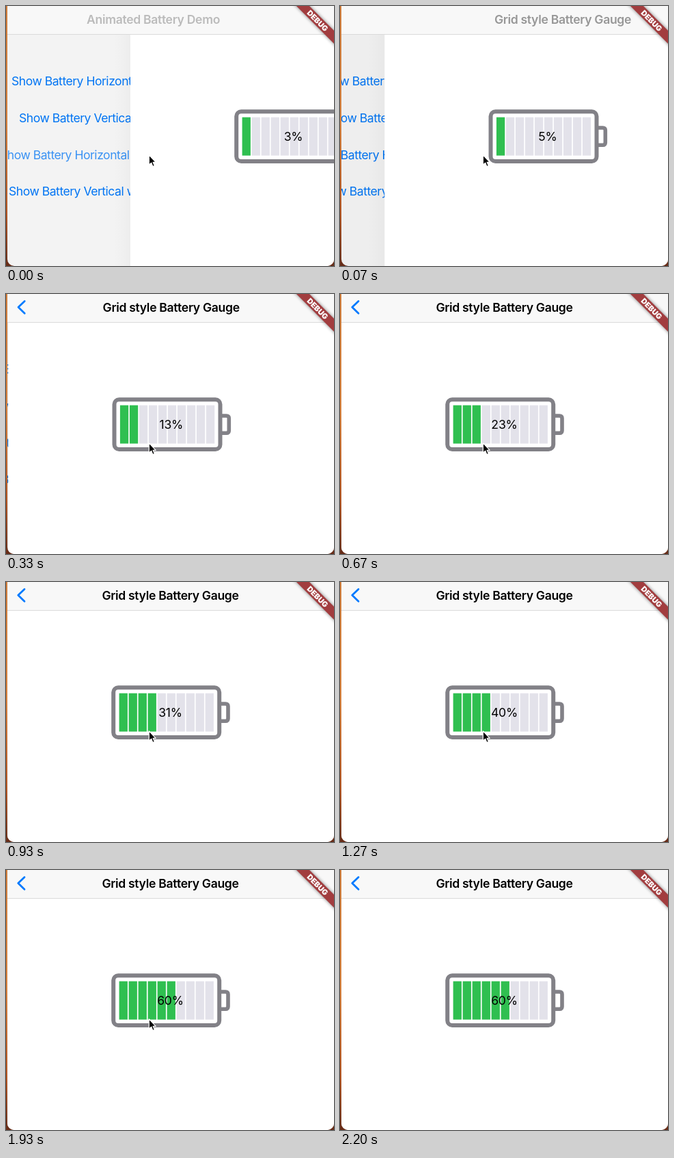
Recreate the animation shown at these times as an HTML page. Size 480 px wide and 380 px high, loop 2.59 s.

```html
<!DOCTYPE html>
<html lang="en">
<head>
<meta charset="utf-8">
<title>Battery gauge</title>
<style>
  html, body { margin: 0; width: 100%; height: 100%; overflow: hidden; }
  svg { display: block; width: 480px; height: 380px; }
  text { font-family: Inter, "Open Sans", sans-serif; font-size: 17.6px; }
  .title { font-weight: 600; letter-spacing: -.33px; text-anchor: middle; }
  .link { fill: #007aff; letter-spacing: -.5px; }
  .label { letter-spacing: -.2px; text-anchor: middle; }
  .ribbon { font-size: 11px; font-weight: 900; fill: #fff; text-anchor: middle; }
  .shell { fill: #fff; stroke: #828187; stroke-width: 6; }
</style>
</head>
<body>
<svg viewBox="0 0 480 380">
  <defs>
    <linearGradient id="desk" x2="0" y2="1">
      <stop offset="0" stop-color="#cf7c3a"/>
      <stop offset=".45" stop-color="#d57f3a"/>
      <stop offset=".8" stop-color="#b0521f"/>
      <stop offset="1" stop-color="#652c18"/>
    </linearGradient>
    <linearGradient id="edge">
      <stop offset="0" stop-opacity="0"/>
      <stop offset="1" stop-opacity=".025"/>
    </linearGradient>
    <filter id="blur" x="-20%" y="-100%" width="140%" height="300%">
      <feGaussianBlur stdDeviation="2.5"/>
    </filter>
    <clipPath id="window"><path d="M2 0H480V370a10 10 0 0 1-10 10H12a10 10 0 0 1-10-10Z"/></clipPath>
  </defs>

  <rect width="480" height="380" fill="url(#desk)"/>
  <g clip-path="url(#window)">
    <rect width="480" height="380" fill="#fff"/>
    <g id="home"></g>
    <rect id="dim" width="480" height="380"/>

    <g id="page">
      <rect x="-22" y="42" width="24" height="338" fill="url(#edge)"/>
      <rect x="2" y="42" width="478" height="338" fill="#fff"/>
      <path class="shell" d="M313 178H321.2Q325 178 325 181.8V199.4Q325 203.2 321.2 203.2H313" style="stroke-width:5.6"/>
      <rect class="shell" x="157.2" y="154.3" width="155" height="72.7" rx="7"/>
      <g id="bars"></g>
      <text id="label" class="label" x="240.5" y="197"></text>
    </g>

    <rect width="480" height="42" fill="#f8f8f8"/>
    <rect y="41" width="480" height="1" fill="#dadada"/>
    <text id="oldTitle" class="title" y="26">Animated Battery Demo</text>
    <text id="newTitle" class="title" y="26">Grid style Battery Gauge</text>
    <path id="back" d="M27 10.5L17.8 19.3L27 28.2" fill="none" stroke="#007aff" stroke-width="2.8" stroke-linecap="round" stroke-linejoin="round"/>

    <g transform="translate(456 21.5) rotate(45)">
      <rect x="-60" y="-6.7" width="120" height="13.4" opacity=".5" filter="url(#blur)"/>
      <rect x="-60" y="-6.7" width="120" height="13.4" fill="#a23d3f"/>
      <text class="ribbon" y="4">DEBUG</text>
    </g>
  </g>
  <path id="cursor" d="M.7 .8V15.2L4 12.2L6.3 17.6L8.8 16.5L6.5 11.3H10.6Z" stroke="#fff" stroke-width="1.2" stroke-linejoin="round"/>
</svg>
<script>
  const LOOP = 2590, WIDTH = 478, MID = 240.5;
  const $ = id => document.getElementById(id);
  const clamp = v => Math.max(0, Math.min(1, v));

  function add(parent, tag, attrs, text = "") {
    const el = document.createElementNS("http://www.w3.org/2000/svg", tag);
    for (const name in attrs) el.setAttribute(name, attrs[name]);
    el.textContent = text;
    return parent.appendChild(el);
  }
  const move = (id, x, y = 0) => $(id).setAttribute("transform", `translate(${x} ${y})`);
  const fade = (id, v) => $(id).setAttribute("opacity", clamp(v));

  // Link positions on the home page at rest
  const links = [
    [107.3, "Show Battery Horizontal"],
    [118.3, "Show Battery Vertical"],
    [90.3, "Show Battery Horizontal w"],
    [103.3, "Show Battery Vertical w"]
  ].map(([x, text], i) => add($("home"), "text", { class: "link", x, y: 116.4 + 53.6 * i }, text));

  const bars = Array.from({ length: 10 }, (_, i) =>
    add($("bars"), "rect", { x: 165.6 + 14 * i, y: 162.6, width: 12.3, height: 56 }));

  // Charge level at given screen ticks
  const charge = [[0, 3], [10, 23], [19, 40], [29, 60.2]];
  function level(tick) {
    for (let i = 1; i < charge.length; i++) {
      const [a, va] = charge[i - 1], [b, vb] = charge[i];
      if (tick <= b) return Math.min(60, va + (vb - va) * (tick - a) / (b - a));
    }
    return 60;
  }

  // The screen refreshes 15 times a second, on whole hundredths
  const tickStart = n => 10 * Math.round(n * 20 / 3);
  function tickAt(ms) {
    let n = Math.floor(ms * .015) + 1;
    while (tickStart(n) > ms) n--;
    return n;
  }

  function draw(ms) {
    const tick = tickAt(ms), t = tickStart(tick);
    const dx = tick > 8 ? 0 : 180 * Math.exp(-t / 67);
    const done = 1 - dx / WIDTH;
    const lag = tick > 8 ? 0 : 85.5 * Math.exp((70 - t) / 60.6);

    move("page", dx);
    move("home", -(WIDTH - dx) / 3);
    fade("dim", .075 * done);
    links[2].setAttribute("opacity", tick ? 1 : .76);

    move("oldTitle", MID - 40 * done);
    fade("oldTitle", (.68 - done) * 4.2);
    move("newTitle", MID + lag);
    fade("newTitle", dx ? (done - .79) / .2 : 1);
    move("back", lag * .2);
    fade("back", dx ? (done - .87) / .13 : 1);

    const value = level(tick);
    $("label").textContent = Math.round(value) + "%";
    bars.forEach((bar, i) => bar.setAttribute("fill", value > i * 10 ? "#2fbf50" : "#e3e2ea"));

    if (t < 2130) move("cursor", 208.6, 217);
    else move("cursor", 236, 191);
    fade("cursor", t < 2200 ? 1 : 0);
  }

  function loop() {
    draw(performance.now() % LOOP);
    requestAnimationFrame(loop);
  }
  loop();
</script>
</body>
</html>
```
